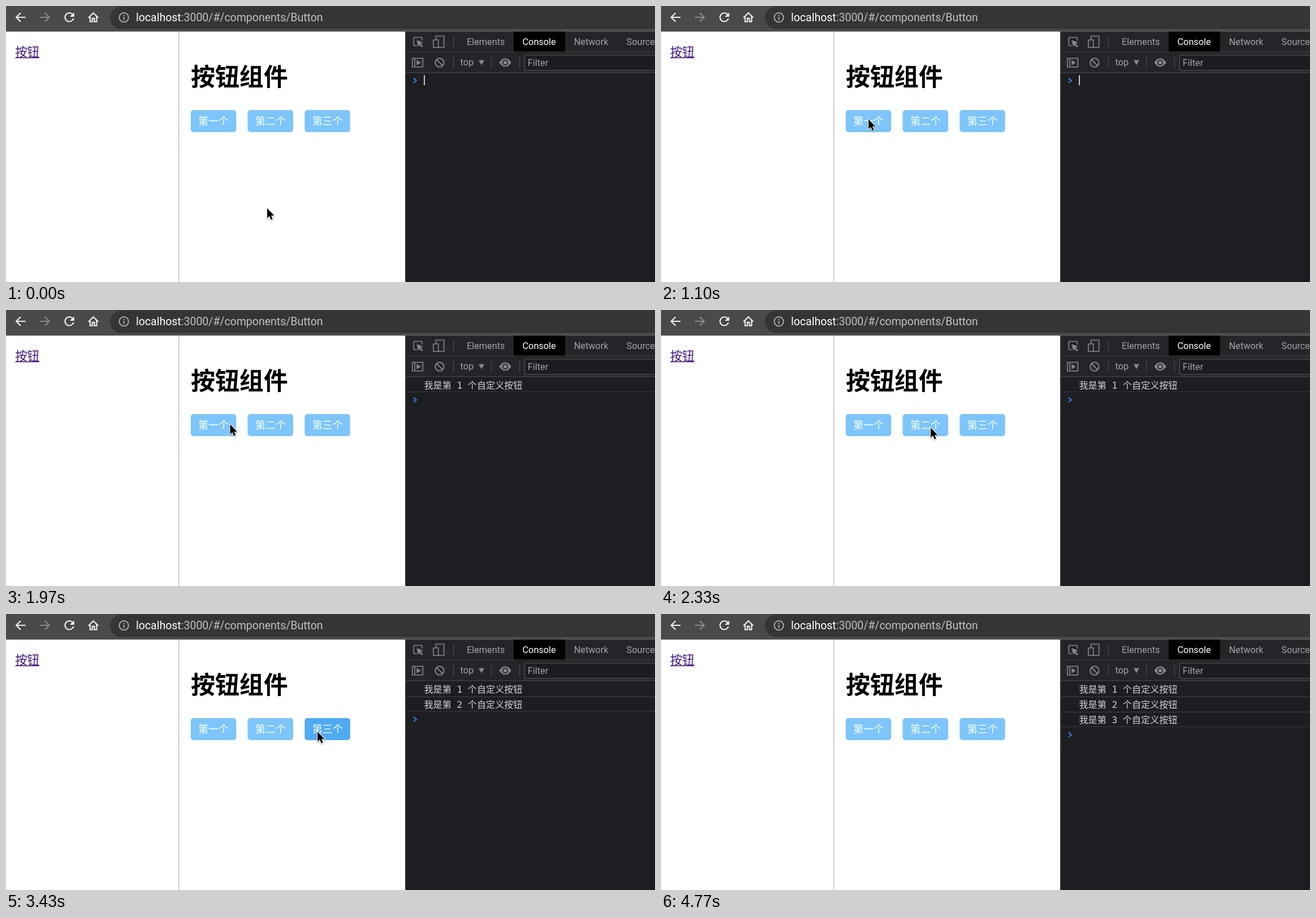
These frames come from a looping animation (1148x488 px, 4930 ms). An HTML page:

```html
<!DOCTYPE html>
<html lang="zh-CN">
<head>
<meta charset="utf-8">
<title>按钮组件</title>
<style>
  html, body { margin: 0; width: 100%; height: 100%; overflow: hidden; background: #fff; }
  svg { display: block; width: 1148px; height: 488px; }
  text { white-space: pre; }
  .ui { font-family: Roboto, "Liberation Sans", sans-serif; font-size: 16.3px; fill: #a0a4a8; }
  .cjk { font-family: "Noto Sans CJK SC", "Noto Sans CJK", sans-serif; }
  .log { font: 16.1px "DejaVu Sans Mono", "Noto Sans CJK SC", "Noto Sans CJK", monospace; fill: #d0d3d7; }
  .line { fill: none; stroke-linecap: butt; }
  .icon { fill: none; stroke: #85888c; stroke-width: 1.6; }
  .solid { fill: #85888c; }
  .rule { stroke: #3b3d41; stroke-width: 1.2; }
  .nav { fill: none; stroke: #f1f1f1; stroke-width: 2.1; }
  #cursor { filter: drop-shadow(0 1.5px 1.2px rgba(0, 0, 0, .35)); }
</style>
</head>
<body>
<svg viewBox="0 0 1148 488" xmlns="http://www.w3.org/2000/svg">
  <rect width="1148" height="488" fill="#fff"/>

  <!-- browser bar -->
  <rect width="1148" height="45" fill="#4a4a4b"/>
  <rect x="184" y="1" width="1000" height="39.5" rx="19.75" fill="#353437"/>
  <rect y="44" width="1148" height="1.4" fill="#5c5c5e"/>
  <path class="nav" d="M34.5 20H18.5M25.8 12.2 18 20l7.8 7.8"/>
  <path class="nav" style="stroke:#8b8b8c" d="M60 20h16M68.700 12.200l7.800 7.800-7.800 7.800"/>
  <path class="nav" d="M118 15.200A7.600 7.600 0 1 0 119.300 22"/>
  <path d="M120.600 11.300v7.700h-7.700z" fill="#f1f1f1"/>
  <path class="nav" d="M145.800 20.800 154.500 12.300l8.700 8.500M148.700 18.800v9h4v-6h3.600v6h4v-9"/>
  <circle cx="208.500" cy="20.300" r="8.200" fill="none" stroke="#b9b9ba" stroke-width="1.700"/>
  <path d="M208.500 19.200v5.300M208.500 15.700v2" stroke="#b9b9ba" stroke-width="1.900"/>
  <text class="ui" x="230" y="27" style="font-size:19.5px;fill:#c2c2c4"><tspan fill="#fff">localhost</tspan>:3000/#/components/Button</text>

  <!-- page -->
  <text class="cjk" x="16.200" y="89" font-size="21.400" fill="#431380">按钮</text>
  <path d="M16.500 91.400h42.500" stroke="#431380" stroke-width="1.500"/>
  <path d="M305.700 45.400V488" stroke="#b8b8b8" stroke-width="1.300"/>
  <text class="cjk" x="327" y="141" font-size="42.900" font-weight="700">按钮组件</text>
  <g id="buttons"></g>

  <!-- developer tools -->
  <rect x="706" y="45.400" width="442" height="443" fill="#1d1e21"/>
  <g id="logs"></g>
  <g id="prompt">
    <path class="rule" d="M707 117.500h441"/>
    <path d="M720.700 127.600 726 131.700l-5.300 4.100" fill="none" stroke="#3a7df0" stroke-width="2"/>
  </g>
  <rect id="caret" x="739.200" y="122.300" width="1.600" height="17.700" fill="#f4f4f4"/>
  <rect x="706" y="45.400" width="442" height="72.800" fill="#242528"/>
  <path d="M706 81h442M706 117.800h442" stroke="#434548" stroke-width="1.200"/>
  <path d="M706.500 45.400V488" stroke="#47484b" stroke-width="1.200"/>
  <rect x="898" y="45.400" width="91" height="35.200" fill="#000"/>
  <g class="ui">
    <text x="815" y="68.800">Elements</text>
    <text x="913.500" y="68.800" fill="#fff">Console</text>
    <text x="1004.700" y="68.800">Network</text>
    <text x="1097.500" y="68.800">Sources</text>
    <text x="803.500" y="105.300">top</text>
  </g>
  <path d="M791.500 53v20.500M791.500 89.500V110M858.500 89.500V110M908.500 89.500V110" stroke="#46484c" stroke-width="1.300"/>

  <path class="icon" d="M727 70.300h-4.200a1.500 1.500 0 0 1-1.500-1.500V57a1.500 1.500 0 0 1 1.500-1.500h11.900A1.500 1.500 0 0 1 736.200 57v4"/>
  <path class="solid" d="M726.200 60.300l11.600 4.200-4.400 2 4.300 4.500-2 2-4.400-4.500-1.700 4z"/>
  <path class="icon" d="M760.500 59.500V53.300h14.200v20h-9.500M756 60h8.800v13.300H756z"/>
  <path class="icon" d="M718.800 92.500h18.600v15.300h-18.600zM723.200 92.500v15.300"/>
  <path class="solid" d="M726.300 95.700l7.600 4.500-7.600 4.500z"/>
  <circle class="icon" cx="767" cy="100.200" r="7.600" style="stroke-width:2"/>
  <path class="icon" d="M761.700 94.900l10.600 10.600" style="stroke-width:2"/>
  <path class="solid" d="M836 95.800h10l-5 8.600z"/>
  <path class="solid" d="M872.300 100q10.700-14.800 21.400 0-10.700 14.800-21.400 0z"/>
  <circle cx="883" cy="100" r="4.200" fill="none" stroke="#242528" stroke-width="1.900"/>
  <rect x="917.500" y="86.800" width="250" height="27" fill="#1c1d20" stroke="#4b4d51" stroke-width="1.300"/>
  <text class="ui" x="922.800" y="106">Filter</text>

  <g id="cursor">
    <path d="M0 0V17.800L4 14 6.700 20.500 9.700 19.200 7 12.900H12.400Z" fill="#000" stroke="#fff" stroke-width="2.400" paint-order="stroke" stroke-linejoin="round"/>
  </g>
</svg>
<script>
const LOOP = 4930;
const ROW = 27.25;
const BLUE = '#7dc5fa', PRESSED = '#50abf3';
const $ = id => document.getElementById(id);

// label, press, release, log time
const buttons = [
  ['第一个', 1270, 1480, 1505],
  ['第二个', 2400, 2580, 2605],
  ['第三个', 3370, 3665, 3690],
];
const logTimes = buttons.map(b => b[3]);

// ms, x, y, easing towards the next point
const path = [
  [0, 462, 357.5],
  [275, 462, 357.5, 'cubic-bezier(.4,.1,.75,.85)'],
  [800, 394, 238, 'cubic-bezier(.2,.35,.5,1)'],
  [1100, 367, 200],
  [1810, 367, 200, 'cubic-bezier(.4,.1,.5,.95)'],
  [2330, 477, 208],
  [2880, 477, 208, 'cubic-bezier(.4,.1,.5,.95)'],
  [3400, 551, 208],
  [4310, 551, 208, 'cubic-bezier(.4,.1,.8,.8)'],
  [4430, 679, 219],
  [4500, 780, 232],
  [4570, 885, 222],
  [4650, 990, 150],
  [4740, 1074, 51],
  [LOOP, 1074, 51],
];

const play = (el, frames) => el.animate(frames, { duration: LOOP, iterations: Infinity });

// Hard changes: each value holds until the next time.
function hold(el, prop, table) {
  const last = table[table.length - 1][1];
  play(el, [...table, [LOOP, last]].map(([t, v]) =>
    ({ offset: t / LOOP, [prop]: v, easing: 'step-end' })));
}

function add(parent, tag, attrs, text = '') {
  const el = document.createElementNS('http://www.w3.org/2000/svg', tag);
  for (const k in attrs) el.setAttribute(k, attrs[k]);
  el.textContent = text;
  return parent.appendChild(el);
}

buttons.forEach(([label, press, release, logged], i) => {
  const x = 326.7 + i * 100.8;
  const box = add($('buttons'), 'rect', { x, y: 184, width: 80.5, height: 39, rx: 5, fill: BLUE });
  add($('buttons'), 'text', { class: 'cjk', x: x + 13.4, y: 210.3, 'font-size': 18, fill: '#fff' }, label);
  hold(box, 'fill', [[0, BLUE], [press, PRESSED], [release, BLUE]]);

  const row = add($('logs'), 'text', { class: 'log', x: 739.5, y: 138.6 + i * ROW }, `我是第 ${i + 1} 个自定义按钮`);
  hold(row, 'opacity', [[0, 0], [logged, 1]]);

  if (i < buttons.length - 1) {
    const rule = add($('logs'), 'path', { class: 'rule', d: `M707 ${118.8 + (i + 1) * ROW}h441` });
    hold(rule, 'opacity', [[0, 0], [logTimes[i + 1], 1]]);
  }
});

hold($('prompt'), 'transform',
  [0, ...logTimes].map((t, n) => [t, `translate(0px, ${n * ROW}px)`]));
hold($('caret'), 'opacity', [[0, 1], [470, 0], [970, 1], [1270, 0]]);
hold($('cursor'), 'opacity', [[0, 1], [4765, 0]]);
play($('cursor'), path.map(([t, x, y, easing = 'linear']) =>
  ({ offset: t / LOOP, transform: `translate(${x}px, ${y}px)`, easing })));
</script>
</body>
</html>
```
